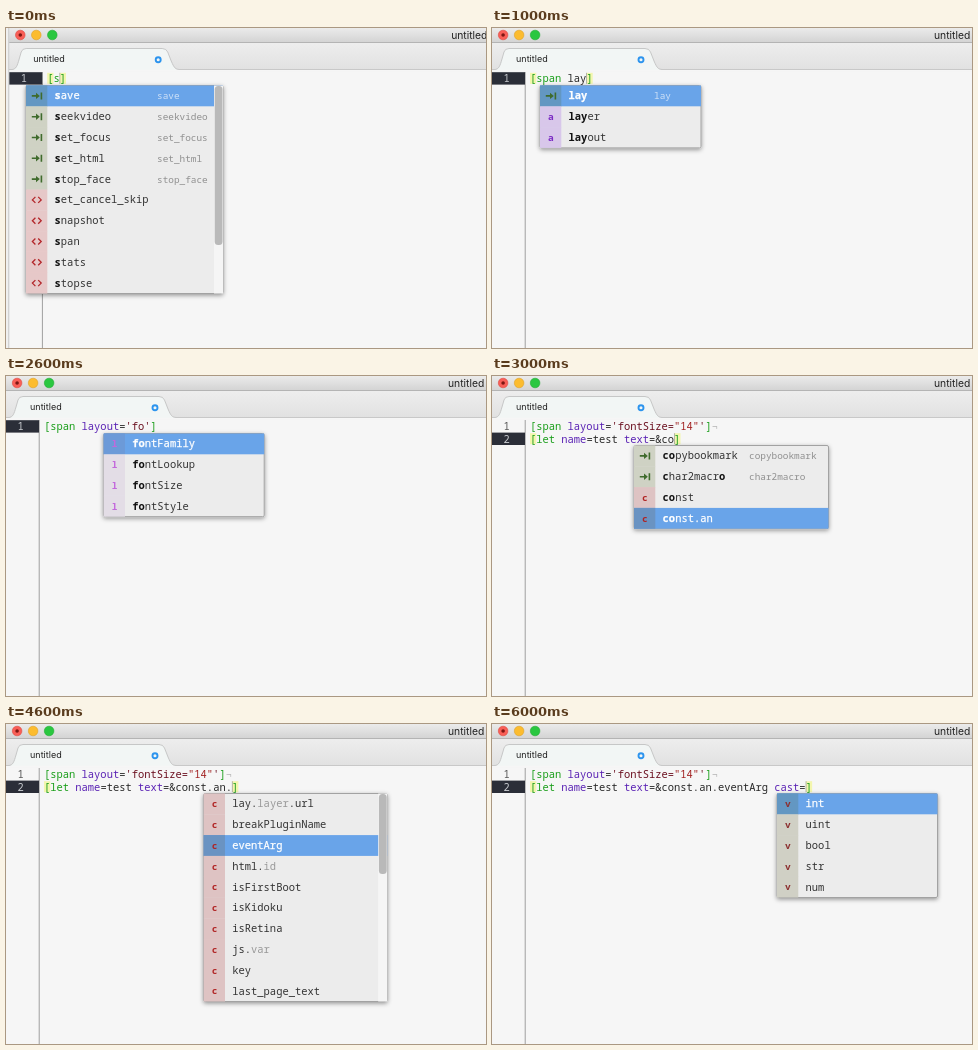
An HTML page that plays this animation: 480 px wide and 320 px high, repeating every 7000 ms.

```html
<!DOCTYPE html>
<html lang="en">
<head>
<meta charset="utf-8">
<title>Editor completion</title>
<style>
html, body { margin: 0; width: 100%; height: 100%; overflow: hidden; background: #f6f6f6; }
svg { display: block; width: 480px; height: 320px; }
text { white-space: pre; }
.mono { font: 10.45px "Noto Sans Mono", "DejaVu Sans Mono", monospace; }
.ui { font-family: Inter, "Open Sans", sans-serif; fill: #222; }
.hint { font-size: 9.4px; }
.b { font-weight: 700; }
.on { fill: #fff; stroke: #fff; stroke-width: .25; }
</style>
</head>
<body>
<svg viewBox="0 0 480 320">
  <defs>
    <linearGradient id="bar" x2="0" y2="1">
      <stop offset="0" stop-color="#ebebeb"/><stop offset="1" stop-color="#d4d4d4"/>
    </linearGradient>
    <linearGradient id="strip" x2="0" y2="1">
      <stop offset="0" stop-color="#eeeeee"/><stop offset="1" stop-color="#e1e1e1"/>
    </linearGradient>
    <filter id="shadow" x="-10%" y="-10%" width="120%" height="125%">
      <feDropShadow dx="0" dy="1.5" stdDeviation="2" flood-opacity=".4"/>
    </filter>
  </defs>
  <rect width="480" height="320" fill="#f0f0f0"/>
  <g id="win">
    <rect width="480" height="320" fill="#f6f6f6"/>
    <rect width="480" height="14" fill="url(#bar)"/>
    <rect y="14" width="480" height="27.5" fill="url(#strip)"/>
    <rect y="14" width="480" height="1" fill="#b4b4b4"/>
    <rect y="41" width="480" height="1" fill="#bcbcbc"/>
    <path d="M0 42H3C7 41 8 38 10 31L12 24Q13 20.5 17 20.5H153Q157 20.5 158.5 24L162 33C165 40 166 41 170 42Z" fill="#f2f6f5"/>
    <path d="M0 41.5H3C7 41 8 38 10 31L12 24Q13 20.5 17 20.5H153Q157 20.5 158.5 24L162 33C165 40 166 41 170 41.5" fill="none" stroke="#bdbdbd" stroke-width=".8"/>
    <rect y="41.8" width="480" height="2" fill="#f6f6f6"/>
    <g stroke-width=".6">
      <circle cx="11.1" cy="7" r="4.8" fill="#f95f57" stroke="#dd4a42"/>
      <circle cx="27.1" cy="7" r="4.8" fill="#fcbc2f" stroke="#dea22a"/>
      <circle cx="43.1" cy="7" r="4.8" fill="#2ac740" stroke="#22ab33"/>
    </g>
    <circle cx="11.1" cy="7" r="1.8" fill="#7d1712"/>
    <text class="ui" x="442" y="11" font-size="10.3">untitled</text>
    <text class="ui" x="24" y="34.4" font-size="9">untitled</text>
    <circle cx="149" cy="31.7" r="2.5" fill="none" stroke="#2c94ee" stroke-width="1.9"/>
    <rect x="32.7" y="44" width="1" height="276" fill="#a0a0a0"/>
    <g id="code" class="mono"></g>
  </g>
  <rect id="edge" x="2.4" width=".8" height="320" fill="#bebebe"/>
  <g id="popup" class="mono"></g>
</svg>
<script>
const CH = 6.27, LEFT = 38, ROW = 20.8, LINE = 12.4;
const G = '#1a9e1a', P = '#5a22b4', D = '#282828', S = '#6b1020', R = '#a11f1f';
const $ = id => document.getElementById(id);
const esc = s => s.replace(/&/g, '&amp;').replace(/</g, '&lt;');
const rect = (x, y, w, h, fill, more = '') =>
  `<rect x="${x}" y="${y}" width="${w}" height="${h}" fill="${fill}" ${more}/>`;

// icon kinds: [column colour, mark colour, column colour when selected]
const kinds = {
  m: ['#cfd2c4', '#3f6b2c', '#6397c2'],
  t: ['#e6c8c8', '#b3262a', '#6d93c4'],
  a: ['#d8c7ea', '#7b2cc4', '#6692d4'],
  l: ['#e3dde6', '#c368dc', '#6c9ad8'],
  c: ['#dec3c3', '#b02323', '#6a93c2'],
  v: ['#d0d0c5', '#8c3030', '#6397c2']
};

// in labels, *x* is a matched part and ~x~ a dimmed part
const head = [[G, '[span'], [D, ' '], [P, 'layout'], [D, '='], [S, "'fontSize="],
  [R, '"14"'], [S, "'"], [G, ']'], ['#b5b5b5', '¬']];
const letLine = rest => [[G, '[let'], [D, ' '], [P, 'name'], [D, '=test '], [P, 'text'],
  [D, '=&'], ...rest, [G, ']']];

const scenes = [
  { dx: 3.2, match: true, lines: [[[G, '[s]']]],
    x: 20, w: 197, hint: 151, sel: 0, thumb: [58, 217],
    items: ['m*s*ave', 'm*s*eekvideo', 'm*s*et_focus', 'm*s*et_html', 'm*s*top_face',
      't*s*et_cancel_skip', 't*s*napshot', 't*s*pan', 't*s*tats', 't*s*topse'] },
  { match: true, lines: [[[G, '[span'], [D, ' lay'], [G, ']']]],
    x: 48, w: 161, hint: 162, sel: 0, items: ['m*lay*', 'a*lay*er', 'a*lay*out'] },
  { lines: [[[G, '[span'], [D, ' '], [P, 'layout'], [D, '='], [S, "'fo'"], [G, ']']]],
    x: 97.7, w: 160.5, sel: 0,
    items: ['l*fo*ntFamily', 'l*fo*ntLookup', 'l*fo*ntSize', 'l*fo*ntStyle'] },
  { match: true, lines: [head, letLine([[D, 'co']])],
    x: 142, w: 194.5, hint: 257, sel: 3,
    items: ['m*co*pybookmark', 'm*c*har2macr*o*', 'c*co*nst', 'c*co*nst.an'] },
  { match: true, lines: [head, letLine([[D, 'const.an.']])],
    x: 197.7, w: 183.5, sel: 2, thumb: [70, 150],
    items: ['clay.~layer~.url', 'cbreakPluginName', 'ceventArg', 'chtml.~id~', 'cisFirstBoot',
      'cisKidoku', 'cisRetina', 'cjs.~var~', 'ckey', 'clast_page_text'] },
  { match: true, lines: [head, letLine([[D, 'const.an.eventArg ca']])],
    x: 254, w: 226, hint: 396, sel: 5, thumb: [70, 243],
    items: ['m*c*h*a*r2macro', 'm*c*opybookm*a*rk', 'a*ca*ll', 'a*ca*che_response', 'a*ca*nskip',
      'a*ca*st', 'c*c*onst.*a*n', 'aclear_lo*ca*l_event', 'a*c*h*a*r', 'a*c*l*a*ss'] },
  { match: true, lines: [head, letLine([[D, 'const.an.eventArg '], [P, 'cast'], [D, '=']])],
    x: 285, w: 160.5, sel: 0, items: ['vint', 'vuint', 'vbool', 'vstr', 'vnum'] }
];

function codeView({ lines, match }) {
  return lines.map((line, i) => {
    const top = 44.2 + i * LINE, base = top + 10, active = i === lines.length - 1;
    const len = line.reduce((n, [, s]) => n + s.length, 0);
    const end = LEFT + (len - 1) * CH;
    let out = '';
    if (active) {
      out += rect(0, top, 33, LINE, '#2b2e38');
      if (match) for (const x of [LEFT, end]) out += rect(x, top + .6, CH, 11, '#f3f6ae');
    }
    out += `<text x="11.5" y="${base}" fill="${active ? '#c9ccd0' : '#555'}">${i + 1}</text>`;
    out += `<text x="${LEFT}" y="${base}">` +
      line.map(([c, s]) => `<tspan fill="${c}">${esc(s)}</tspan>`).join('') + '</text>';
    if (active && match) out += rect(end - .2, top + .6, .7, 11, '#999');
    return out;
  }).join('');
}

function icon(kind, x, y, color) {
  if (kind === 'm')
    return `<g transform="translate(${x} ${y})"><path d="M-5 0H1M4.6-3.5V3.5" stroke="${color}" stroke-width="1.6"/>` +
      `<path d="M-.8-3.2L3 0L-.8 3.2Z" fill="${color}"/></g>`;
  if (kind === 't')
    return `<path d="M${x - 1.4} ${y - 3}l-3 3l3 3M${x + 1.4} ${y - 3}l3 3l-3 3" fill="none" stroke="${color}" stroke-width="1.3"/>`;
  return `<text class="b" x="${x}" y="${y + 3.2}" text-anchor="middle" font-size="9.5" fill="${color}">${kind}</text>`;
}

function label(s, on) {
  return s.split(/(\*[^*]+\*|~[^~]+~)/).map(p => {
    if (p[0] === '*') return `<tspan class="b" fill="${on ? '#fff' : '#111'}">${p.slice(1, -1)}</tspan>`;
    if (p[0] === '~') return `<tspan fill="#999">${p.slice(1, -1)}</tspan>`;
    return `<tspan>${p}</tspan>`;
  }).join('');
}

function popupView({ x, w, hint, sel, thumb, items, lines }) {
  const top = lines.length > 1 ? 69.5 : 57.5, h = items.length * ROW;
  let out = rect(x, top, w, h, '#ececec', 'rx="1.5" stroke="#a2a2a2" stroke-width="1" filter="url(#shadow)"');
  items.forEach((item, i) => {
    const kind = item[0], y = top + i * ROW, mid = y + ROW / 2, on = i === sel;
    const [bg, ink, bgOn] = kinds[kind];
    if (on) out += rect(x, y, w, ROW, '#69a4e9');
    out += rect(x, y, 21.3, ROW + (i < items.length - 1 ? .3 : 0), on ? bgOn : bg);
    out += icon(kind, x + 10.8, mid, ink);
    out += `<text x="${x + 28.6}" y="${mid + 3.5}" ${on ? 'class="on"' : 'fill="#333"'}>` +
      `${label(item.slice(1), on)}</text>`;
    if (kind === 'm' && hint)
      out += `<text class="hint" x="${hint}" y="${mid + 3.4}" fill="${on ? '#cfe1f7' : '#8f8f8f'}">` +
        `${item.slice(1).replace(/\*/g, '')}</text>`;
  });
  if (thumb) {
    out += rect(x + w - 9, top, 9, h, '#f5f5f5');
    out += rect(x + w - 8.3, thumb[0], 7.8, thumb[1] - thumb[0], '#b9b9b9', 'rx="3.5"');
  }
  return out;
}

let shown = -1;
function draw(ms) {
  const n = Math.floor(ms % 7000 / 1000);
  if (n !== shown) {
    shown = n;
    const s = scenes[n];
    $('win').setAttribute('transform', `translate(${s.dx || 0} 0)`);
    $('edge').setAttribute('visibility', s.dx ? 'visible' : 'hidden');
    $('code').innerHTML = codeView(s);
    $('popup').innerHTML = popupView(s);
  }
}
function tick() {
  draw(performance.now());
  requestAnimationFrame(tick);
}
tick();
</script>
</body>
</html>
```
